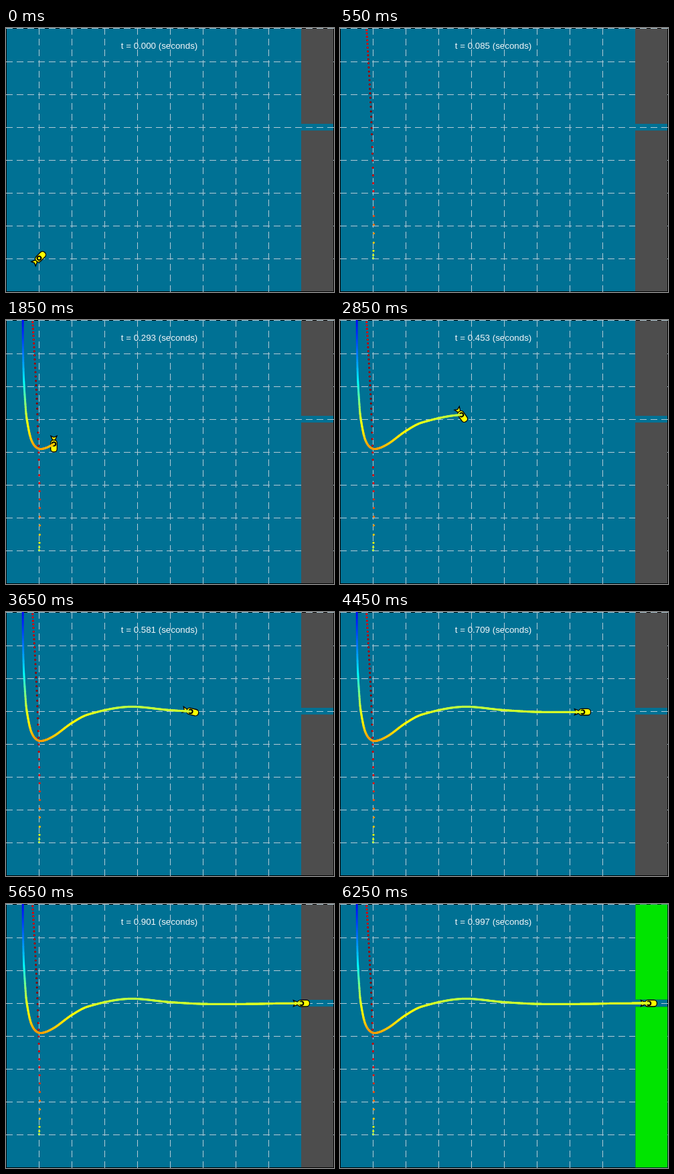
Recreate the animation shown at these times as an HTML page with a canvas. Size 490 by 394 pixels, loop 6.3 s.

```html
<!DOCTYPE html>
<html lang="en">
<meta charset="utf-8">
<title>Path through a gap</title>
<style>
html, body { margin: 0; width: 100%; height: 100%; overflow: hidden; background: #007194; }
canvas { display: block; }
</style>
<canvas id="stage" width="490" height="394"></canvas>
<script>
const ctx = document.getElementById('stage').getContext('2d');
const W = 490, H = 394, CELL = 49, WALL = 441;
const STEP = 50, STEPS = 126, ARRIVAL = 955;

// Simulated ms, x, y, position on the colour scale
const path = [
  [0, 49, 343, .56], [2, 49.5, 332, .62], [4, 50, 306, .73], [8, 49.7, 255, .86],
  [14, 48, 187, .94], [22, 45.5, 117, .99], [42, 39, -2, .88], [60, 35, -58, .7],
  [80, 30, -72, .4], [100, 26, -42, .15], [118, 24.7, 0, .13], [150, 25.7, 76, .32],
  [181, 29, 133, .54], [195, 31, 150, .6], [222, 36.5, 176, .67], [240, 43, 188, .72],
  [260, 52.5, 192, .72], [293, 71, 184.5, .68], [337, 98, 165, .63], [371, 122, 152.5, .6],
  [453, 181, 141, .56], [540, 245, 146, .575], [607, 294, 148.6, .58], [709, 362, 148.7, .59],
  [785, 400, 148, .59], [901, 441, 147.7, .59], [997, 461, 147.7, .59]
];
// Simulated ms, heading in degrees
const heading = [[0, -45], [100, -55], [181, -32], [240, 40], [293, 90],
  [335, 92], [453, 55], [580, 14], [709, 0], [997, 0]];

// Smooth curve through unevenly spaced keys
function sample(keys, t) {
  let i = 0;
  while (i < keys.length - 2 && keys[i + 1][0] < t) i++;
  const a = keys[i], b = keys[i + 1];
  const before = keys[Math.max(i - 1, 0)], after = keys[Math.min(i + 2, keys.length - 1)];
  const d = b[0] - a[0], u = (t - a[0]) / d, w = 1 - u;
  return a.slice(1).map((p, j) => {
    const c = j + 1, q = b[c];
    const m = (q - before[c]) / (b[0] - before[0]) * d;
    const n = (after[c] - p) / (after[0] - a[0]) * d;
    return w * w * (1 + 2 * u) * p + u * u * (3 - 2 * u) * q + u * w * (w * m - u * n);
  });
}

function jet(v) {
  const part = c => 255 * Math.min(1, Math.max(0, 1.5 - Math.abs(4 * v - c)));
  return `rgb(${part(3)},${part(2)},${part(1)})`;
}

const dots = Array.from({ length: 998 }, (_, t) => {
  const [x, y, v] = sample(path, t);
  return { x, y, color: jet(v) };
});

function line(x1, y1, x2, y2) {
  ctx.beginPath();
  ctx.moveTo(x1, y1);
  ctx.lineTo(x2, y2);
  ctx.stroke();
}

function drawScene(arrived) {
  ctx.fillStyle = '#007194';
  ctx.fillRect(0, 0, W, H);
  ctx.lineWidth = 1;
  ctx.strokeStyle = '#000';
  ctx.strokeRect(.5, .5, W - 1, H - 1);
  ctx.strokeStyle = '#b3cbd6';
  ctx.setLineDash([10, 6]);
  for (let x = CELL; x < WALL; x += CELL) line(x + .5, H, x + .5, 0);
  for (let y = 1; y < H - 1; y += CELL) line(0, y - .5 + (y > 1), W, y - .5 + (y > 1));
  ctx.setLineDash([]);

  ctx.fillStyle = arrived ? '#00e400' : '#4d4d4d';
  ctx.fillRect(WALL, 1, W - 1 - WALL, 142);
  ctx.fillRect(WALL, 153, W - 1 - WALL, 240);
  if (arrived) {
    ctx.strokeStyle = '#064';
    ctx.setLineDash([1, 1]);
    ctx.strokeRect(WALL + .5, .5, 48, 142);
    ctx.strokeRect(WALL + .5, 153.5, 48, 240);
    ctx.setLineDash([]);
  }
}

function drawFish(x, y, angle) {
  ctx.save();
  ctx.translate(x + .5, y + .5);
  ctx.rotate(angle * Math.PI / 180);
  ctx.fillStyle = '#ff0';
  ctx.strokeStyle = '#000';
  ctx.lineWidth = 1.3;
  ctx.beginPath();
  ctx.moveTo(-5, -1.5);
  ctx.lineTo(-12, -4.5);
  ctx.lineTo(-10, 0);
  ctx.lineTo(-12, 4.5);
  ctx.lineTo(-5, 1.5);
  ctx.closePath();
  ctx.fill();
  ctx.stroke();
  ctx.beginPath();
  ctx.roundRect(-6, -4.8, 18, 9.6, 4.5);
  ctx.fill();
  ctx.stroke();
  ctx.lineWidth = 2;
  ctx.beginPath();
  ctx.arc(0, 0, 2.8, 0, 7);
  ctx.stroke();
  ctx.restore();
}

function drawTrail(t) {
  for (const { x, y, color } of dots.slice(0, t)) {
    ctx.fillStyle = color;
    ctx.beginPath();
    ctx.arc(x + .5, y + .5, 1.6, 0, 7);
    ctx.fill();
  }
}

function draw(now) {
  const n = Math.floor(now / STEP) % STEPS;
  const t = Math.max(0, 8 * n - 3);
  drawScene(t >= ARRIVAL);
  drawFish(dots[t].x, dots[t].y, sample(heading, t)[0]);
  drawTrail(t);
  ctx.fillStyle = '#f2f6f8';
  ctx.font = '13.33px "Liberation Sans", Arial, sans-serif';
  ctx.textAlign = 'center';
  ctx.fillText(`t = ${(t / 1000).toFixed(3)} (seconds)`, 229, 31);
  requestAnimationFrame(frame);
}

const start = performance.now();
function frame() { draw(performance.now() - start); }
frame();
</script>
</html>
```
